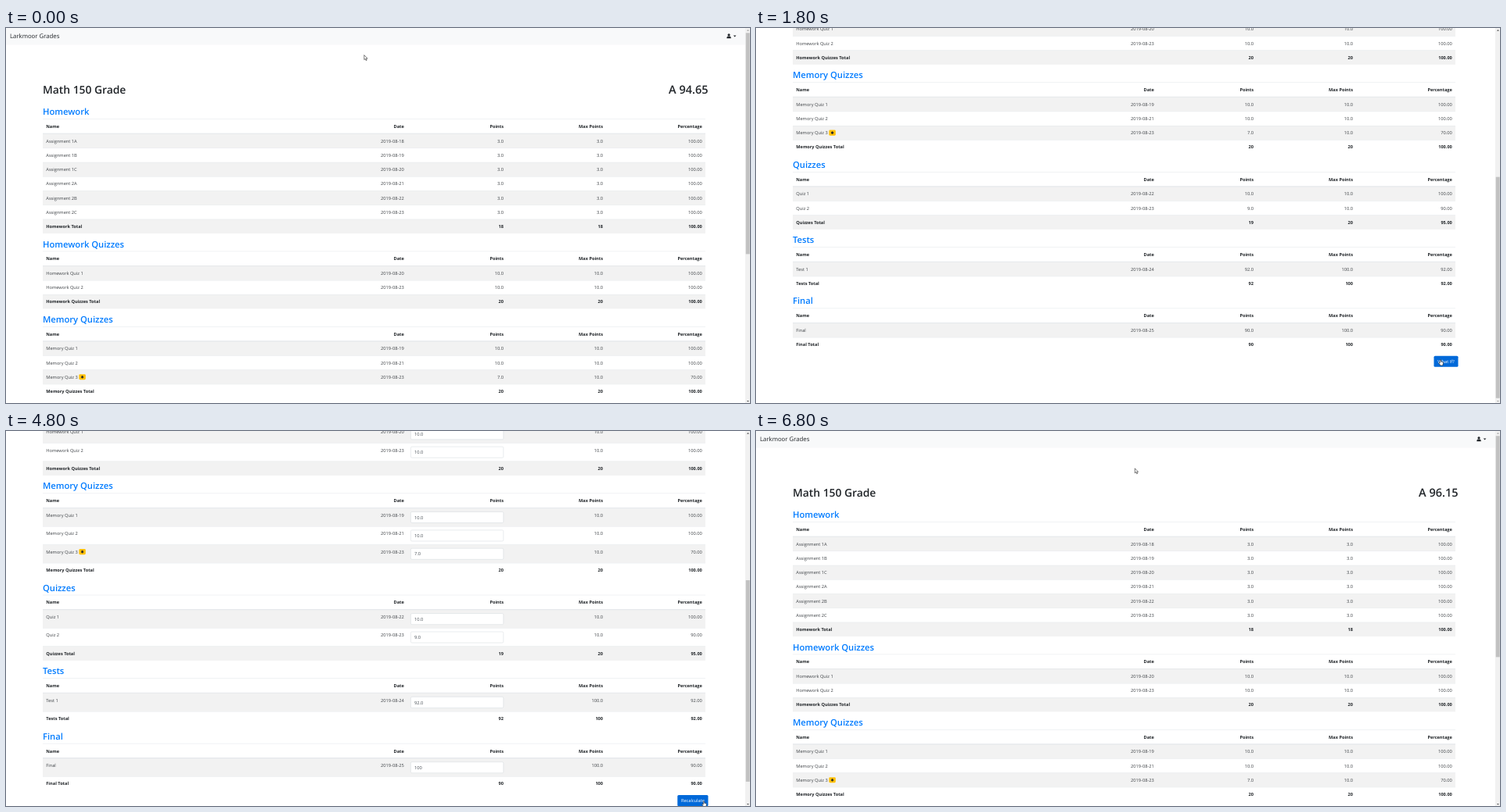
An HTML page for the animation above (7 s loop, 951x480 px).

```html
<!DOCTYPE html>
<html lang="en">
<head>
<meta charset="utf-8">
<title>Grades</title>
<style>
  html, body { margin: 0; width: 100%; height: 100%; overflow: hidden; background: #fff; }
  svg { display: block; width: 951px; height: 480px; }
  text { font: 400 5.7px "Open Sans", "Noto Sans", sans-serif; fill: #3f4347; text-rendering: geometricPrecision; white-space: pre; }
  .bold { font-weight: 700; font-size: 5.6px; fill: #212529; }
  .h2 { font-weight: 600; font-size: 11.2px; fill: #007bff; }
  .h1 { font-weight: 600; font-size: 13.85px; fill: #212529; }
  .grade { font-size: 14.5px; }
  .brand { font-weight: 500; font-size: 7.8px; fill: #212529; }
  .field { fill: #495057; }
  .label { fill: #fff; }
  .end { text-anchor: end; }
  .mid { text-anchor: middle; }
</style>
</head>
<body>
<svg id="stage" viewBox="0 0 951 480"></svg>
<script>
const LOOP = 7000, VIEW = 480;
const ROW = 18.23, EDIT_ROW = 23.4;
const LEFT = 47, WIDTH = 847, RIGHT = 897.5;
const COLS = [508.8, 636, 763, 889.8];

// name, day, points, max points, dropped
const SECTIONS = [
  ["Homework", ["1A", "1B", "1C", "2A", "2B", "2C"].map((n, i) => ["Assignment " + n, 18 + i, 3, 3])],
  ["Homework Quizzes", [["Homework Quiz 1", 20, 10, 10], ["Homework Quiz 2", 23, 10, 10]]],
  ["Memory Quizzes", [["Memory Quiz 1", 19, 10, 10], ["Memory Quiz 2", 21, 10, 10], ["Memory Quiz 3", 23, 7, 10, true]]],
  ["Quizzes", [["Quiz 1", 22, 10, 10], ["Quiz 2", 23, 9, 10]]],
  ["Tests", [["Test 1", 24, 92, 100]]],
  ["Final", [["Final", 25, 90, 100]]]
];

// Each track is a list of [time, ...values]; a value holds until the next entry.
const VIEWS = [[0, "before"], [2000, "edit"], [5200, "after"]];
const SCROLL = [[0, 0], [200, 110], [600, 247], [800, 312.6], [2000, 343.8], [5200, 312.6], [6000, 251.6], [6200, 0]];
const FIELD = [[0, "90.0", ""], [3000, "90.0", "focus"], [3200, "90.0", "select"],
  [3600, "1", "focus"], [3800, "10", "focus"], [4000, "100", "focus"], [4800, "100", ""]];
const POINTER = [
  [0, 457.8, 34.6, "arrow"], [200, 458.5, 36, "arrow"], [600, 459.3, 38, "arrow"],
  [800, 480, 70, "arrow"], [1000, 620, 210, "arrow"], [1200, 780, 360, "arrow"],
  [1600, 862, 416, "arrow"], [1800, 875, 424.5, "hand"], [2000, 875, 424.5, "arrow"],
  [2200, 840, 426, "arrow"], [2600, 690, 430, "arrow"], [2800, 560, 431, "beam"],
  [3000, 534, 431, "beam"], [3200, 492.3, 435.7, "arrow"], [4200, 560, 446, "arrow"],
  [4600, 770, 464, "arrow"], [4800, 892, 473.7, "hand"], [5200, 892, 473.7, "arrow"],
  [5600, 886, 470, "arrow"], [5800, 835, 451, "arrow"], [6000, 769.2, 427.8, "arrow"],
  [6200, 630, 240, "arrow"], [6600, 500, 80, "arrow"], [6800, 484.3, 47.8, "arrow"]
];

const at = (track, t) => track.findLast(step => step[0] <= t).slice(1);

function add(parent, tag, attrs = {}) {
  const el = document.createElementNS("http://www.w3.org/2000/svg", tag);
  for (const k in attrs) el.setAttribute(k, attrs[k]);
  return parent.appendChild(el);
}
const rect = (p, x, y, width, height, fill, more) => add(p, "rect", { x, y, width, height, fill, ...more });
const path = (p, d, fill, more) => add(p, "path", { d, fill, ...more });
function text(p, x, y, str, cls = "") {
  const el = add(p, "text", { x, y, class: cls });
  el.textContent = str;
  return el;
}
const show = (el, on) => el.setAttribute("visibility", on ? "inherit" : "hidden");

function cells(p, y, name, values, cls = "") {
  text(p, 51.3, y, name, cls);
  values.forEach((v, i) => v !== "" && text(p, COLS[i], y, v, cls + " end"));
}

function input(p, y, value) {
  const box = rect(p, 517.4, y, 118.4, 14.1, "#fff", { rx: 1.5, stroke: "#ced4da", "stroke-width": 0.45 });
  return { box, y, label: text(p, 522, y + 9.2, value, "field") };
}

function badge(p, y) {
  rect(p, 93.3, y - 5.6, 8.5, 7.1, "#ffc107", { rx: 1.4 });
  const star = add(p, "g", { transform: `translate(97.55 ${y - 2.05})`, stroke: "#212529", "stroke-width": 0.9 });
  for (const a of [0, 60, 120]) add(star, "line", { y1: -1.8, y2: 1.8, transform: `rotate(${a})` });
}

function button(p, y, width, label) {
  const box = rect(p, RIGHT - width, y, width, 14.1, "#007bff", { rx: 1.5 });
  text(p, RIGHT - width / 2, y + 9.1, label, "label mid");
  return box;
}

function navbar(p) {
  rect(p, 0, 0, 946, 21.6, "#f8f9fa");
  text(p, 5, 12.6, "Larkmoor Grades", "brand");
  add(p, "circle", { cx: 924, cy: 8.7, r: 1.55, fill: "#212529" });
  path(p, "M921.4 13.3V12.2Q921.4 10.6 923 10.6H925Q926.6 10.6 926.6 12.2V13.3Z", "#212529");
  path(p, "M929.7 9.6H933.4L931.55 11.5Z", "#212529");
}

function buildPage(grade, edit, finalPoints) {
  const g = add(pages, "g"), page = { g };
  navbar(g);
  text(g, LEFT, 84.2, "Math 150 Grade", "h1");
  text(g, RIGHT, 84.2, grade, "h1 grade end");
  let y = 107.2;
  for (const [title, rows] of SECTIONS) {
    text(g, LEFT, y + 4, title, "h2");
    rect(g, LEFT, y + 9.2, WIDTH, 0.45, "#dee2e6");
    cells(g, y + 20.9, "Name", ["Date", "Points", "Max Points", "Percentage"], "bold");
    rect(g, LEFT, y + 27.5, WIDTH, 0.8, "#dee2e6");
    y += 28.2;
    let sum = 0, total = 0;
    const startRow = (i, height) => {
      if (i % 2 === 0) rect(g, LEFT, y, WIDTH, height, "#f2f2f2");
      rect(g, LEFT, y, WIDTH, 0.4, "#dee2e6");
    };
    rows.forEach(([name, day, pts, max, dropped], i) => {
      const height = edit ? EDIT_ROW : ROW;
      const changed = title === "Final" && finalPoints;
      if (changed) pts = finalPoints;
      if (!dropped) { sum += pts; total += max; }
      startRow(i, height);
      const shown = changed ? String(pts) : pts.toFixed(1);
      cells(g, y + 11.2, name, ["2019-08-" + day, edit ? "" : shown, max.toFixed(1), (100 * pts / max).toFixed(2)]);
      if (dropped) badge(g, y + 11.2);
      if (edit) page.field = input(g, y + 4.8, shown);
      y += height;
    });
    startRow(rows.length, ROW);
    cells(g, y + 11.2, title + " Total", ["", sum, total, (100 * sum / total).toFixed(2)], "bold");
    y += ROW + 13.5;
  }
  y -= 7.9;
  page.button = edit ? button(g, y, 39.2, "Recalculate") : button(g, y, 31, "What If?");
  page.height = y + 60.2;
  return page;
}

// Focus ring, selection, caret and spinner of the field being edited.
function buildFocus({ g, field }) {
  const { y, box, label } = field;
  const ring = rect(g, 516.8, y - 0.6, 119.6, 15.3, "none", { rx: 2, stroke: "#bfdeff", "stroke-width": 1.2 });
  const mark = rect(g, 522, y + 3.2, 11.3, 7.9, "#3390ff");
  g.insertBefore(mark, label);
  const caret = rect(g, 522, y + 3.4, 0.5, 7.4, "#212529");
  const spin = add(g, "g");
  rect(spin, 625.6, y + 3, 5, 8.2, "#f0f0f0");
  path(spin, `M626.8 ${y + 6}h2.8l-1.4 -1.7zM626.8 ${y + 8.2}h2.8l-1.4 1.7z`, "#505050");
  return (value, mode) => {
    const on = mode !== "", selected = mode === "select";
    label.textContent = value;
    label.style.fill = selected ? "#fff" : "";
    box.setAttribute("stroke", on ? "#80bdff" : "#ced4da");
    show(ring, on);
    show(spin, on);
    show(mark, selected);
    show(caret, on && !selected);
    caret.setAttribute("x", 522.2 + value.length * 3.26);
  };
}

function buildScrollbar() {
  const g = add(stage, "g");
  rect(g, 944.8, 0, 6.2, VIEW, "#f1f1f1");
  const thumb = rect(g, 945.7, 0, 5, 0, "#c1c1c1");
  const up = path(g, "M946.9 3.8h3l-1.5 -1.7z", "#505050");
  const down = path(g, "M946.9 476.9h3l-1.5 1.7z", "#505050");
  const tint = (el, on) => el.setAttribute("fill", on ? "#505050" : "#a3a3a3");
  return (scroll, height) => {
    const k = 467.4 / height;
    thumb.setAttribute("y", 6.3 + scroll * k);
    thumb.setAttribute("height", VIEW * k);
    tint(up, scroll > 0);
    tint(down, scroll < height - VIEW - 1);
  };
}

function buildPointer() {
  const g = add(stage, "g");
  const line = { stroke: "#111", "stroke-width": 0.55, "stroke-linejoin": "round" };
  const shapes = {
    arrow: path(g, "M0 0V6L1.4 4.8L2.4 7L3.4 6.6L2.4 4.5H4.3Z", "#fff", line),
    hand: path(g, "M-.7 .4Q0 -.5 .7 .4V2.6L3 3.1Q3.6 3.3 3.5 4L3 6.2V7.4H-.6V6.5L-2.3 4.4Q-2 3.3 -.7 4.3Z", "#fff", line),
    beam: path(g, "M-1.2 -3.2H1.2M0 -3.2V3.2M-1.2 3.2H1.2", "none", line)
  };
  return (x, y, kind) => {
    g.setAttribute("transform", `translate(${x} ${y})`);
    for (const k in shapes) show(shapes[k], k === kind);
  };
}

const stage = document.getElementById("stage");
const pages = add(stage, "g");
const views = {
  before: buildPage("A 94.65", false),
  edit: buildPage("A 94.65", true),
  after: buildPage("A 96.15", false, 100)
};
const setField = buildFocus(views.edit);
const setScrollbar = buildScrollbar();
const setPointer = buildPointer();

function draw(t) {
  const [name] = at(VIEWS, t), [scroll] = at(SCROLL, t), [x, y, kind] = at(POINTER, t);
  const view = views[name];
  for (const k in views) show(views[k].g, k === name);
  pages.setAttribute("transform", `translate(0 ${-scroll})`);
  view.button.setAttribute("fill", kind === "hand" ? "#0069d9" : "#007bff");
  if (name === "edit") setField(...at(FIELD, t));
  else setField("90.0", "");
  setScrollbar(scroll, view.height);
  setPointer(x, y, kind);
}

const start = performance.now();
function tick() {
  draw((performance.now() - start) % LOOP);
  requestAnimationFrame(tick);
}
tick();
</script>
</body>
</html>
```
